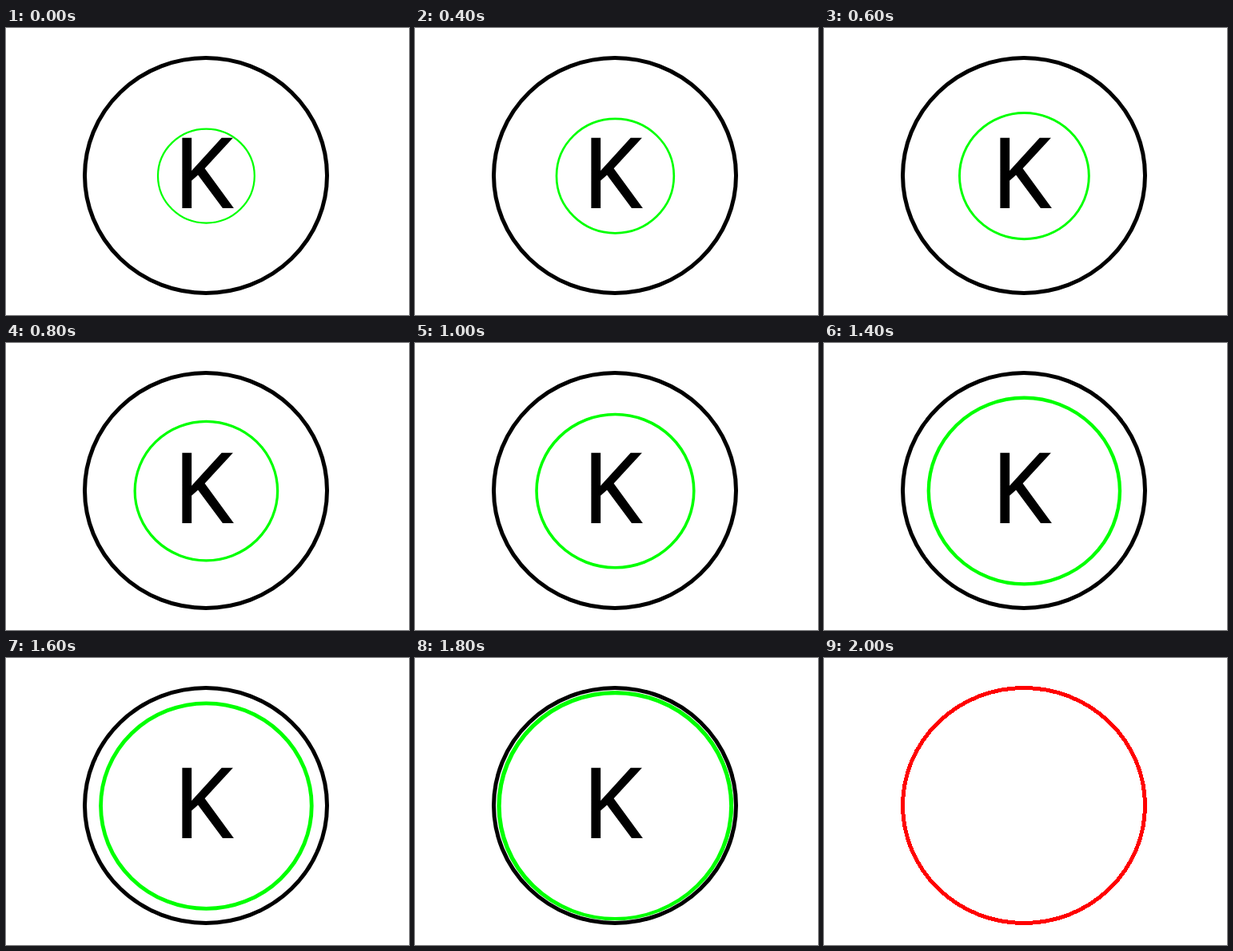
Recreate the animation shown at these times as an HTML page. Size 504 by 360 pixels, loop 2.5 s.

```html
<!DOCTYPE html>
<html lang="en">
<head>
<meta charset="utf-8">
<title>Expanding ring</title>
<style>
  html, body { margin: 0; width: 100%; height: 100%; overflow: hidden; background: #fff; }
  svg { display: block; width: 504px; height: 360px; }
  ellipse { fill: none; }
  #ring { stroke: #000; stroke-width: 5; }
  #pulse { stroke: #0f0; stroke-width: 2.2; }
  #letter { font: 120px "Open Sans", "Noto Sans", sans-serif; stroke: #000; stroke-width: 1.8; }
  .missed #ring { stroke: #f00; shape-rendering: crispEdges; }
  .missed #pulse, .missed #letter { visibility: hidden; }
</style>
</head>
<body>
<svg id="stage" viewBox="0 0 504 360">
  <clipPath id="inside"><ellipse cx="250" cy="185" rx="148.3" ry="144.3"/></clipPath>
  <g clip-path="url(#inside)">
    <ellipse id="pulse" rx="60.4" ry="59"/>
  </g>
  <ellipse id="ring" cx="250" cy="185" rx="151.5" ry="147.5"/>
  <text id="letter" x="209.5" y="225.3">K</text>
</svg>
<script>
  const LOOP = 2500, STEP = 100, LAST = 20, GROWTH = 1.05;
  const stage = document.getElementById('stage');
  const pulse = document.getElementById('pulse');
  const start = performance.now();

  function draw(now) {
    const time = Math.max(0, now - start) % LOOP;
    const step = Math.min(LAST, Math.floor(time / STEP));
    // Each step enlarges the pulse, line weight included, by 5%.
    pulse.setAttribute('transform', `translate(250.4 185.6) scale(${GROWTH ** step})`);
    stage.classList.toggle('missed', step === LAST);
    requestAnimationFrame(draw);
  }
  draw(start);
</script>
</body>
</html>
```
